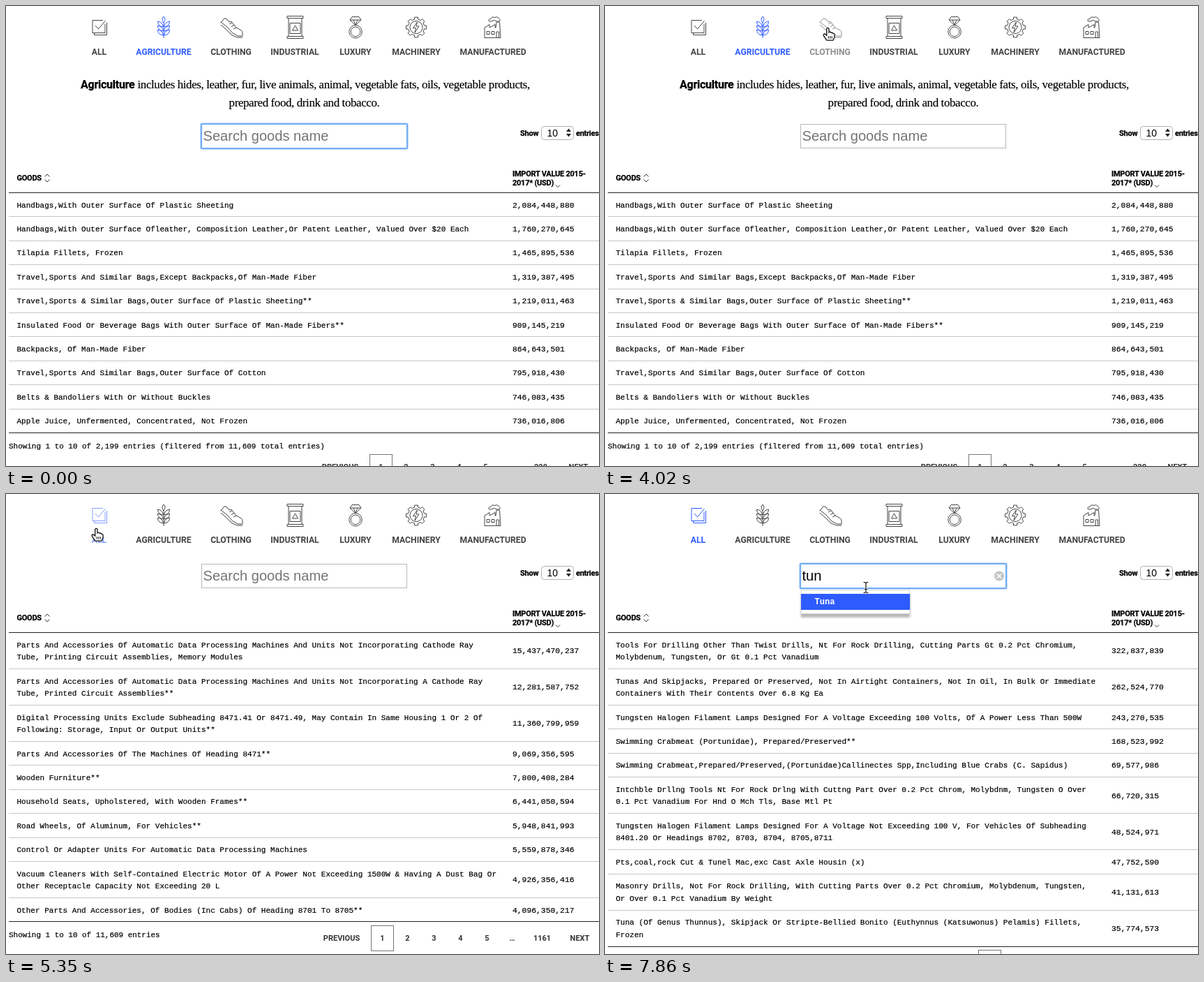
These frames come from a looping animation (850 px wide and 659 px high, 8000 ms). An HTML page:

```html
<!DOCTYPE html>
<html lang="en">
<head>
<meta charset="utf-8">
<title>Goods search</title>
<style>
  html, body { margin: 0; width: 100%; height: 100%; overflow: hidden; background: #fff; }
  svg { display: block; width: 100vw; height: 100vh; }
  text { white-space: pre; }
  .mono { font: 11.03px "Liberation Mono", monospace; stroke: #000; stroke-width: .2px; }
  .value { font-size: 11.35px; }
  .info { font-size: 10.95px; }
  .item { font-size: 12.05px; fill: #222; stroke: none; }
  .picked { font-weight: bold; fill: #fff; }
  .bold { font: bold 11px Roboto, sans-serif; letter-spacing: -.25px; stroke: #000; stroke-width: .25px; }
  .nav { font-size: 12.2px; letter-spacing: 0; stroke: none; }
  .page { letter-spacing: 0; fill: #333; stroke: none; }
  .lead { font-size: 16px; }
  .serif { font: 17px "Liberation Serif", serif; letter-spacing: -.41px; stroke: #000; stroke-width: .15px; }
  .field { font: 20.1px "Liberation Sans", sans-serif; }
  .select { font: 14px "Liberation Sans", sans-serif; }
  .menu { filter: drop-shadow(0 5px 1.5px rgba(0, 0, 0, .28)); }
</style>
</head>
<body>
<svg id="stage" viewBox="0 0 850 659" preserveAspectRatio="none"></svg>
<script>
const LOOP = 8000, BLUE = '#2e5bff';

// One row per line: first line | second line # value
const parseRows = source => source.trim().split('\n').map(row => {
  const [label, value] = row.split('#');
  return { lines: label.split('|'), value };
});

const views = {
  agriculture: {
    nav: 1, shift: 0, last: '220', wrapped: true, pageShift: -2,
    info: 'Showing 1 to 10 of 2,199 entries (filtered from 11,609 total entries)',
    rows: parseRows(`
Handbags,With Outer Surface Of Plastic Sheeting#2,084,448,880
Handbags,With Outer Surface Ofleather, Composition Leather,Or Patent Leather, Valued Over $20 Each#1,760,270,645
Tilapia Fillets, Frozen#1,465,895,536
Travel,Sports And Similar Bags,Except Backpacks,Of Man-Made Fiber#1,319,387,495
Travel,Sports & Similar Bags,Outer Surface Of Plastic Sheeting**#1,219,011,463
Insulated Food Or Beverage Bags With Outer Surface Of Man-Made Fibers**#909,145,219
Backpacks, Of Man-Made Fiber#864,643,501
Travel,Sports And Similar Bags,Outer Surface Of Cotton#795,918,430
Belts & Bandoliers With Or Without Buckles#746,083,435
Apple Juice, Unfermented, Concentrated, Not Frozen#736,016,806`)
  },
  clothing: {
    nav: 2, shift: -23.5,
    rows: parseRows(`
Hats And Other Headgear, Knitted Or Crocheted, Or Like Fabric, Other Headwear Not For Babies, Not Braid,|Of Man-Made Fibers, Less Than 23 Percent Wool#964,881,766
Hats And Other Headgear, Not Knitted, Other Headwear, Other Than For Babies, Not Braided, Except|Disposable Headwear, Of Man-Made Fibers#875,371,564
Hats And Other Headgear, Not Knitted Headwear, Other Than For Babies, Certified Handloomed; And|Headwear, Of Cotton#705,609,277
Other Carpets And Textile Floor Coverings, Whether Or Not Made Up, Of Man-Made Fibers#396,124,105
Synthetic Filament Yarn: Single, High Tenacity,Monofilament/Multifilament,Lt 5 Turns/Me Ter, Of|Polyester Filament, Gt 920 Decitex, Not For Ret Sale#316,986,898
Carpets And Oth Text Floor Coverings, Tufted, Whether Or Not Made Up: Of Oth Man-Made Fibers, Measuring|Not More Than 5.25 M2 In Area: Not Hand-Hooked#314,898,781
Synthetic Staple Fibers, Not Carded Or Combed, Or Otherwise Processed For Spinning: Of Polyesters|Measuring 13.2 Decitex Or More**#252,106,351
Hats And Other Headgear, Not Knitted, Other Headwear, Other Than Certified Hand-Loomed; Not Headwear Of|Cotton, Of Vegetable Fibers#226,447,886
Oth Non-Woven Fab, Of Man-Made Filaments, Oth Thanfloor Covering Underlays & Laminated Fab, Not|Impregnated#`)
  },
  all: {
    nav: 0, shift: -69, last: '1161', pageShift: 0,
    info: 'Showing 1 to 10 of 11,609 entries',
    rows: parseRows(`
Parts And Accessories Of Automatic Data Processing Machines And Units Not Incorporating Cathode Ray|Tube, Printing Circuit Assemblies, Memory Modules#15,437,470,237
Parts And Accessories Of Automatic Data Processing Machines And Units Not Incorporating A Cathode Ray|Tube, Printed Circuit Assemblies**#12,281,587,752
Digital Processing Units Exclude Subheading 8471.41 Or 8471.49, May Contain In Same Housing 1 Or 2 Of|Following: Storage, Input Or Output Units**#11,360,799,959
Parts And Accessories Of The Machines Of Heading 8471**#9,069,356,595
Wooden Furniture**#7,800,408,284
Household Seats, Upholstered, With Wooden Frames**#6,441,050,594
Road Wheels, Of Aluminum, For Vehicles**#5,948,841,993
Control Or Adapter Units For Automatic Data Processing Machines#5,559,878,346
Vacuum Cleaners With Self-Contained Electric Motor Of A Power Not Exceeding 1500W & Having A Dust Bag Or|Other Receptacle Capacity Not Exceeding 20 L#4,926,356,416
Other Parts And Accessories, Of Bodies (Inc Cabs) Of Heading 8701 To 8705**#4,096,350,217`)
  },
  tu: {
    nav: 0, shift: -69, last: '575', wrapped: true, pageShift: -1, menuWidth: 199,
    info: 'Showing 1 to 10 of 5,749 entries (filtered from 11,609 total entries)',
    menu: ['Tuna', 'Turbines', 'Turbot', 'Turnips', 'Agricultural equipment',
      'Concrete Mixture', 'Furniture', 'Other manufactured'],
    rows: parseRows(`
Parts And Accessories Of Automatic Data Processing Machines And Units Not Incorporating Cathode Ray|Tube, Printing Circuit Assemblies, Memory Modules#15,437,470,237
Parts And Accessories Of Automatic Data Processing Machines And Units Not Incorporating A Cathode Ray|Tube, Printed Circuit Assemblies**#12,281,587,752
Wooden Furniture**#7,800,408,284
Household Seats, Upholstered, With Wooden Frames**#6,441,050,594
Floor Coverings Of Vinyl Tile, Whether Or Not Self-Adhesive#3,726,501,016
Metal Furniture, Excluding Office & Household**#3,128,013,334
Static Converters For Telecommunication Apparatus#2,964,157,537
Household Chandelier And Oth Elec Ceiling/Wall Lighting Fittings, Excluding Those Used In Lighting|Public Spaces Of Base Metal Except Of Brass**#2,950,981,865
Non-Portable Cooking Appliances And Plate Warmers For Gas Fuel Or For Both Gas And Other Fuels, Of Iron|Or Steel**#2,943,002,986
Electric Lamps And Lighting Fittings Base Metal Except Of Brass#2,781,545,675`)
  },
  tun: {
    nav: 0, shift: -69, last: '', pageShift: 12, menuWidth: 156, info: '', menu: ['Tuna'],
    rows: parseRows(`
Tools For Drilling Other Than Twist Drills, Nt For Rock Drilling, Cutting Parts Gt 0.2 Pct Chromium,|Molybdenum, Tungsten, Or Gt 0.1 Pct Vanadium#322,837,839
Tunas And Skipjacks, Prepared Or Preserved, Not In Airtight Containers, Not In Oil, In Bulk Or Immediate|Containers With Their Contents Over 6.8 Kg Ea#262,524,770
Tungsten Halogen Filament Lamps Designed For A Voltage Exceeding 100 Volts, Of A Power Less Than 500W#243,270,535
Swimming Crabmeat (Portunidae), Prepared/Preserved**#168,523,992
Swimming Crabmeat,Prepared/Preserved,(Portunidae)Callinectes Spp,Including Blue Crabs (C. Sapidus)#69,577,986
Intchble Drllng Tools Nt For Rock Drlng With Cuttng Part Over 0.2 Pct Chrom, Molybdnm, Tungsten O Over|0.1 Pct Vanadium For Hnd O Mch Tls, Base Mtl Pt#66,720,315
Tungsten Halogen Filament Lamps Designed For A Voltage Not Exceeding 100 V, For Vehicles Of Subheading|8401.20 Or Headings 8702, 8703, 8704, 8705,8711#48,524,971
Pts,coal,rock Cut & Tunel Mac,exc Cast Axle Housin (x)#47,752,590
Masonry Drills, Not For Rock Drilling, With Cutting Parts Over 0.2 Pct Chromium, Molybdenum, Tungsten,|Or Over 0.1 Pct Vanadium By Weight#41,131,613
Tuna (Of Genus Thunnus), Skipjack Or Stripte-Bellied Bonito (Euthynnus (Katsuwonus) Pelamis) Fillets,|Frozen#35,774,573`)
  }
};

const wheat = 'M226 46V23M226 15q-4 4 0 9q4-5 0-9' + [25, 31, 37].map(y =>
  `M225.5 ${y + 5}q-8-1-8-8q7 1 8 8M226.5 ${y + 5}q8-1 8-8q-7 1-8 8`).join('');
const gear = 'M' + Array.from({ length: 32 }, (_, i) => {
  const corner = i % 4, outer = corner === 1 || corner === 2;
  const angle = (i - corner) * Math.PI / 16 + (corner < 2 ? -1 : 1) * (outer ? .17 : .21);
  const radius = outer ? 14.6 : 11.8;
  return `${(588 + radius * Math.cos(angle)).toFixed(1)} ${(30.5 + radius * Math.sin(angle)).toFixed(1)}`;
}).join('L') + 'Z';

const navItems = [
  ['ALL', 133.5, 'M142 26V38.5H124V20.5H139M128 28l4.5 5 10-12M126.5 38.5v3h18V24'],
  ['AGRICULTURE', 226, wheat],
  ['CLOTHING', 322.5, 'M308 24l5-6.5 4 1.5 3 4 3-1 7 9 6 3q4 2 3 6v3h-6l-8-4-8-9-9-7zM308 27l8 7 8 8 8 3h7M320 26l4-2M323 29.5l4-2M326 33l4-2'],
  ['INDUSTRIAL', 414, 'M403 14.5h23v3h-23zM405 17.5V43.5M424 17.5V43.5M403 43.5h23v3h-23zM407 24.5h15v15h-15zM414.5 28l4 7h-8z'],
  ['LUXURY', 501, 'M496 15.5h10l3 4.5-8 7.5-8-7.5zM493 20h16M498 20l3 7 3-7M501 27.5a9.2 9.2 0 1 0 .1 0M501 30a6.8 6.8 0 1 0 .1 0'],
  ['MACHINERY', 588, gear + 'M588 21.5a9 9 0 1 0 .1 0M589.5 23l-6 8.5h4l-1.5 6.5 6-9h-4z'],
  ['MANUFACTURED', 698, 'M686 45.5V31l7-4.5v4.5l8-4.5V31h1l1-8h4.5l1.5 22.5zM689 36.5h4v4h-4zM696 36.5h4v4h-4zM703 45v-8h3.5v8M692 21.5q-1-3 3-3q1-4 5-2q5-2 7 2q3 2 0 3.5h-4q-3-3-5-1q-3 2-6 .5'],
];

const escape = s => s.replace(/&/g, '&amp;');
const text = (x, y, cls, content, extra = '') =>
  `<text x="${x}" y="${y}" class="${cls}" ${extra}>${escape(content)}</text>`;
const centered = (x, y, cls, content, extra = '') => text(x, y, cls, content, `text-anchor="middle" ${extra}`);
const rect = (x, y, w, h, extra) => `<rect x="${x}" y="${y}" width="${w}" height="${h}" ${extra}/>`;
const path = (d, extra) => `<path d="${d}" ${extra}/>`;
const outline = (color, width = 1) => `fill="none" stroke="${color}" stroke-width="${width}"`;
const rule = (y, color) => rect(4, Math.round(y - .5), 846, 1, `fill="${color}"`);

// Cursor moves: start, end, number of steps, destination
const moves = [
  [450, 750, 3, 460, 187], [1050, 1200, 2, 471, 187], [2990, 3440, 4, 134, 45], [3580, 4020, 4, 321, 40],
  [4470, 5060, 5, 131, 58], [5500, 6080, 5, 383, 125], [7860, 7860, 1, 374, 134],
];
const caretOn = [[150, 600], [1050, 1650], [2090, 2690], [3140, 3730], [6080, 6530], [6820, 7570]];

function cursorAt(t) {
  let x = 845, y = 285;
  for (const [start, end, steps, toX, toY] of moves) {
    if (t < start) break;
    const gap = (end - start) / (steps - 1) || 1;
    const part = Math.min(steps, Math.floor((t - start) / gap + .02) + 1) / steps;
    x += (toX - x) * part;
    y += (toY - y) * part;
  }
  return { x, y };
}

const viewAt = t => t < 4170 ? views.agriculture : t < 5350 ? views.clothing
  : t < 6970 ? views.all : t < 7120 ? views.tu : views.tun;
const typedAt = t => 'tun'.slice(0, t < 6820 ? 0 : t < 6970 ? 1 : t < 7120 ? 2 : 3);

const drawNav = (active, hovered) => navItems.map(([label, x, icon], i) => {
  const color = i === active ? BLUE : '#444';
  return `<g opacity="${i === hovered ? .6 : 1}">${path(icon, outline(color))}` +
    centered(x, 70.3, 'bold nav', label, `fill="${color}"`) + '</g>';
}).join('');

function drawIntro(view) {
  if (view === views.agriculture) return text(107, 118, 'bold lead', 'Agriculture') +
    text(188.5, 118, 'serif', 'includes hides, leather, fur, live animals, animal, vegetable fats, oils, vegetable products,') +
    centered(427.5, 143.5, 'serif', 'prepared food, drink and tobacco.');
  if (view === views.clothing) return text(181, 118, 'bold lead', 'Clothing and textile supplies') +
    text(383, 118, 'serif', 'include textiles, footwear and other apparels.');
  return '';
}

function drawSearch(y, typed, focused, caret) {
  const box = focused
    ? rect(278.5, y - 18.5, 298, 38, `rx="2" ${outline('#c3ddfb')}`) + rect(280, y - 17, 295, 35, `rx="1" ${outline('#74aff3', 2.2)}`)
    : rect(280.5, Math.round(y - 17) + .5, 294, 34, outline('#b8b8b8'));
  const clear = `<circle cx="565" cy="${y + .5}" r="7" fill="#c6c6c6"/>` +
    path(`M562 ${y - 2.5}l6 6m0-6l-6 6`, outline('#fff', 1.5));
  const caretX = 283 + [0, 5.5, 17, 28][typed.length];
  return box + text(282.5, y + 6.5, 'field', typed || 'Search goods name', `fill="${typed ? '#000' : '#757575'}"`) +
    (typed ? clear : '') + (caret ? rect(caretX, Math.round(y - 10), 1, 22, 'fill="#000"') : '');
}

const drawEntries = y => text(737, y + 4, 'bold', 'Show') + text(817, y + 4, 'bold', 'entries') +
  rect(767.5, Math.round(y - 10) + .5, 46, 19, `rx="4" ${outline('#b0b0b0')}`) +
  text(775.5, y + 5, 'select', '10') +
  path(`M803 ${y - 1.5}l3.5-4.5 3.5 4.5zM803 ${y + 1.5}l3.5 4.5 3.5-4.5z`, 'fill="#222"');

function drawTable({ shift, rows, info, last, wrapped, pageShift }) {
  let y = 267.5 + shift;
  let out = text(15.5, y - 17.5, 'bold', 'GOODS') + text(726, y - 24, 'bold', 'IMPORT VALUE 2015-') +
    text(726, y - 10.8, 'bold', '2017* (USD)') +
    path(`M55.5 ${y - 23}l3.5-3.5 3.5 3.5m-7 4l3.5 3.5 3.5-3.5M788 ${y - 11}l3 3 3-3`, outline('#333')) +
    rule(y, '#222');
  rows.forEach(({ lines, value }, i) => {
    const height = lines.length > 1 ? 52 : 34.4, base = y + height / 2 + 3.8;
    lines.forEach((line, n) => out += text(15.5, base + (n - (lines.length - 1) / 2) * 17.6, 'mono', line));
    out += text(726, base, 'mono value', value);
    y += height;
    out += rule(y, i === 9 ? '#222' : '#c6c6c6');
  });
  return info === undefined ? out : out + text(4, y + 22, 'mono info', info) +
    drawPages(Math.round(y + (wrapped ? 31 : 5)), pageShift, last);
}

const drawPages = (top, dx, last) => rect(523.5 + dx, top + .5, 32, 36, outline('#777')) +
  [['PREVIOUS', 481], ['1', 539.5], ['2', 575.5], ['3', 613.5], ['4', 651.5], ['5', 689.5], ['…', 725.5], [last, 768.5], ['NEXT', 822.5]]
    .map(([label, x]) => centered(x + dx, top + 22, 'bold page', label)).join('');

const drawMenu = ({ menu, menuWidth }) => !menu ? '' :
  rect(281, 138, menuWidth, menu.length * 22.6 + 11, 'fill="#fff" stroke="#c4c4c4" stroke-width=".6" class="menu"') +
  rect(281, 143, menuWidth, 23, `fill="${BLUE}"`) +
  menu.map((label, i) => text(300.5, 158.3 + i * 22.6, i ? 'mono item' : 'mono item picked', label)).join('');

const pointers = {
  hand: '<g transform="scale(1.08)">' +
    path('M-3 8.5L-7 2.5Q-8 0-5.5 0L-3 2V-7Q-1.5-9 0-7V-2Q1.5-3.5 3-1.5Q4.5-2.5 5.5-.5Q7-1 7.5 1V4L5.5 8.5Z', 'fill="#fff" stroke="#111" stroke-width="1.2"') +
    path('M-.5 3V6M1.7 3V6M3.9 3V6', outline('#111')) + '</g>',
  beam: [['#fff', 3], ['#111', 1.2]].map(([color, width]) =>
    path('M-3.5-7.5H-1.5L0-6.5 1.5-7.5H3.5M0-6.5V6.5M-3.5 7.5H-1.5L0 6.5 1.5 7.5H3.5M-2 2.5H2', outline(color, width))).join(''),
  arrow: path('M0 0V14L3.2 11 6 17 8.2 16 5.5 10.5H10Z', 'fill="#000" stroke="#fff"'),
};

function draw(t) {
  const view = viewAt(t), { x, y } = cursorAt(t), fieldY = 186 + view.shift;
  const hovered = y < 75 ? navItems.findIndex(([label, cx]) => Math.abs(x - cx) < 8 + label.length * 3.5) : -1;
  const inField = x > 280 && x < 575 && Math.abs(y - fieldY) < 20;
  const pointer = hovered >= 0 ? 'hand' : inField ? 'beam' : 'arrow';
  const focused = t < 4020 || t >= 6080;
  const caret = caretOn.some(([on, off]) => t >= on && t < off);
  return drawNav(view.nav, t < 450 ? -1 : hovered) + drawIntro(view) + drawTable(view) +
    drawEntries(181.5 + view.shift) + drawSearch(fieldY, typedAt(t), focused, caret) + drawMenu(view) +
    (t < 450 ? '' : `<g transform="translate(${x} ${y})">${pointers[pointer]}</g>`);
}

const stage = document.getElementById('stage');
let shown = '';
function tick() {
  const picture = draw(performance.now() % LOOP);
  if (picture !== shown) stage.innerHTML = shown = picture;
  requestAnimationFrame(tick);
}
tick();
</script>
</body>
</html>
```
